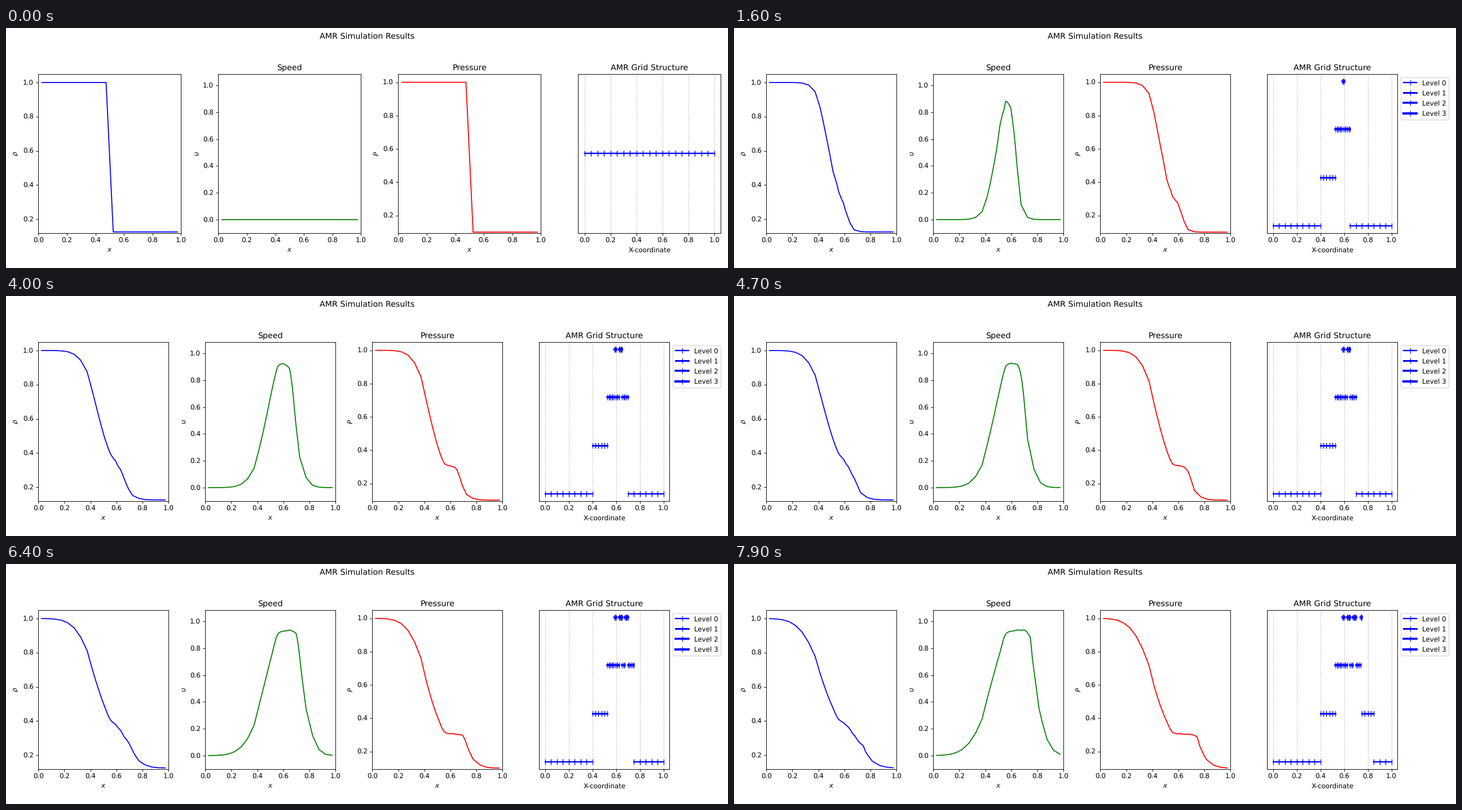
Recreate the animation shown at these times as a matplotlib script. Size 1280x427 px, loop 8 s.

```python
import numpy as np
import matplotlib.pyplot as plt
from matplotlib.animation import FuncAnimation

plt.rcParams["text.hinting"] = "no_hinting"

W, H, DPI = 1280, 427, 256 / 3
TOP, BOTTOM = 81.8, 364.7
FRAMES, STEP_MS = 80, 100
FINE = 160  # cells across the tube at the deepest level
GAMMA, CFL = 1.4, 0.5

# Mesh refinement: step, first and last fine cell, new level
REFINE = [
    (2, 64, 104, 1), (4, 84, 104, 2), (6, 94, 96, 3),
    (24, 104, 112, 1), (24, 100, 104, 3), (30, 104, 112, 2),
    (52, 112, 120, 1), (52, 108, 112, 3), (54, 112, 120, 2),
    (66, 120, 128, 1), (70, 118, 120, 3), (72, 128, 136, 1),
]


def primitive(state):
    rho, mom, energy = state
    u = mom / rho
    return rho, u, (GAMMA - 1) * (energy - 0.5 * rho * u ** 2)


def hll_flux(left, right):
    def side(state):
        rho, u, p = primitive(state)
        flux = np.array([rho * u, rho * u ** 2 + p, (state[2] + p) * u])
        return flux, u, np.sqrt(GAMMA * p / rho)

    f_l, u_l, c_l = side(left)
    f_r, u_r, c_r = side(right)
    slow = np.minimum(0, np.minimum(u_l - c_l, u_r - c_r))
    fast = np.maximum(0, np.maximum(u_l + c_l, u_r + c_r))
    return (fast * f_l - slow * f_r + slow * fast * (right - left)) / (fast - slow)


def advance(state, dx):
    """One first-order finite volume step on a non-uniform mesh."""
    rho, u, p = primitive(state)
    dt = CFL * dx.min() / np.max(np.abs(u) + np.sqrt(GAMMA * p / rho))
    padded = np.pad(state, ((0, 0), (1, 1)), mode="edge")
    flux = hll_flux(padded[:, :-1], padded[:, 1:])
    return state - dt / dx * np.diff(flux, axis=1)


def split_cells(levels):
    starts, i = [], 0
    while i < FINE:
        starts.append(i)
        i += 8 >> levels[i]
    starts = np.array(starts)
    return starts, 8 >> levels[starts]


def simulate():
    """Shock tube on the refining mesh: (starts, widths, levels, gas) per step."""
    left_half = np.arange(FINE) < FINE // 2
    rho = np.where(left_half, 1.0, 0.125)
    p = np.where(left_half, 1.0, 0.1)
    tube = np.array([rho, 0 * rho, p / (GAMMA - 1)])
    levels = np.zeros(FINE, int)
    history = []
    for n in range(FRAMES):
        for step, a, b, level in REFINE:
            if step == n:
                levels[a:b] = level
        starts, sizes = split_cells(levels)
        state = tube[:, starts]  # new cells inherit their parent's value
        history.append((starts / FINE, sizes / FINE, levels[starts],
                        primitive(state)))
        tube = np.repeat(advance(state, sizes / FINE), sizes, axis=1)
    return history


history = simulate()

fig = plt.figure(figsize=(W / DPI, H / DPI), dpi=DPI, facecolor="white")
fig.suptitle("AMR Simulation Results")
axes = [fig.add_axes([0.1 + 0.2 * k, 0.15, 0.15, 0.66]) for k in range(4)]
grid_ax = axes[3]

PANELS = [
    ("", r"$\rho$", "b", (0.11875, 1.05)),
    ("Speed", "$u$", "g", (-0.1, 1.0865)),
    ("Pressure", "$P$", "r", (0.095, 1.05)),
]
curves = []
for ax, (title, label, color, ylim) in zip(axes, PANELS):
    ax.set(title=title, xlabel="$x$", ylabel=label, xlim=(0, 1), ylim=ylim)
    curves += ax.plot([], [], color=color)

grid_ax.set(title="AMR Grid Structure", xlabel="X-coordinate",
            xlim=(-0.05, 1.05), yticks=[])
grid_ax.grid(True, axis="x", linestyle="--", alpha=0.7)
for ax in axes:
    ax.set_xticks(np.arange(6) / 5)
bars = [grid_ax.plot([], [], "b|-", lw=2 + 0.5 * k, ms=8,
                     label=f"Level {k}")[0] for k in range(4)]


def place_axes(pitch, width):
    for k, ax in enumerate(axes):
        ax.set_position([(57.3 + k * pitch) / W, 1 - BOTTOM / H,
                         width / W, (BOTTOM - TOP) / H])


def draw_mesh(starts, widths, levels):
    count = levels.max() + 1
    for k, bar in enumerate(bars):
        on = levels == k
        a, b = starts[on], (starts + widths)[on]
        xs = np.column_stack([a, b, np.full(len(a), np.nan)]).ravel()
        bar.set_data(xs, np.full(len(xs), k))
    if count == 1:
        place_axes(319, 253)
        grid_ax.set_ylim(-0.055, 0.055)
        if grid_ax.get_legend():
            grid_ax.get_legend().remove()
    else:
        place_axes(296.05, 230.6)
        pad = 0.05 * (count - 1)
        grid_ax.set_ylim(-pad, count - 1 + pad)
        grid_ax.legend(handles=bars[:count], loc="upper left",
                       bbox_to_anchor=(1, 1), labelspacing=0.54)


def update(n):
    starts, widths, levels, gas = history[n]
    for curve, values in zip(curves, gas):
        curve.set_data(starts + widths / 2, values)
    draw_mesh(starts, widths, levels)
    return curves + bars


anim = FuncAnimation(fig, update, frames=FRAMES, interval=STEP_MS,
                     repeat=True, repeat_delay=0, blit=False)
plt.show()
```
